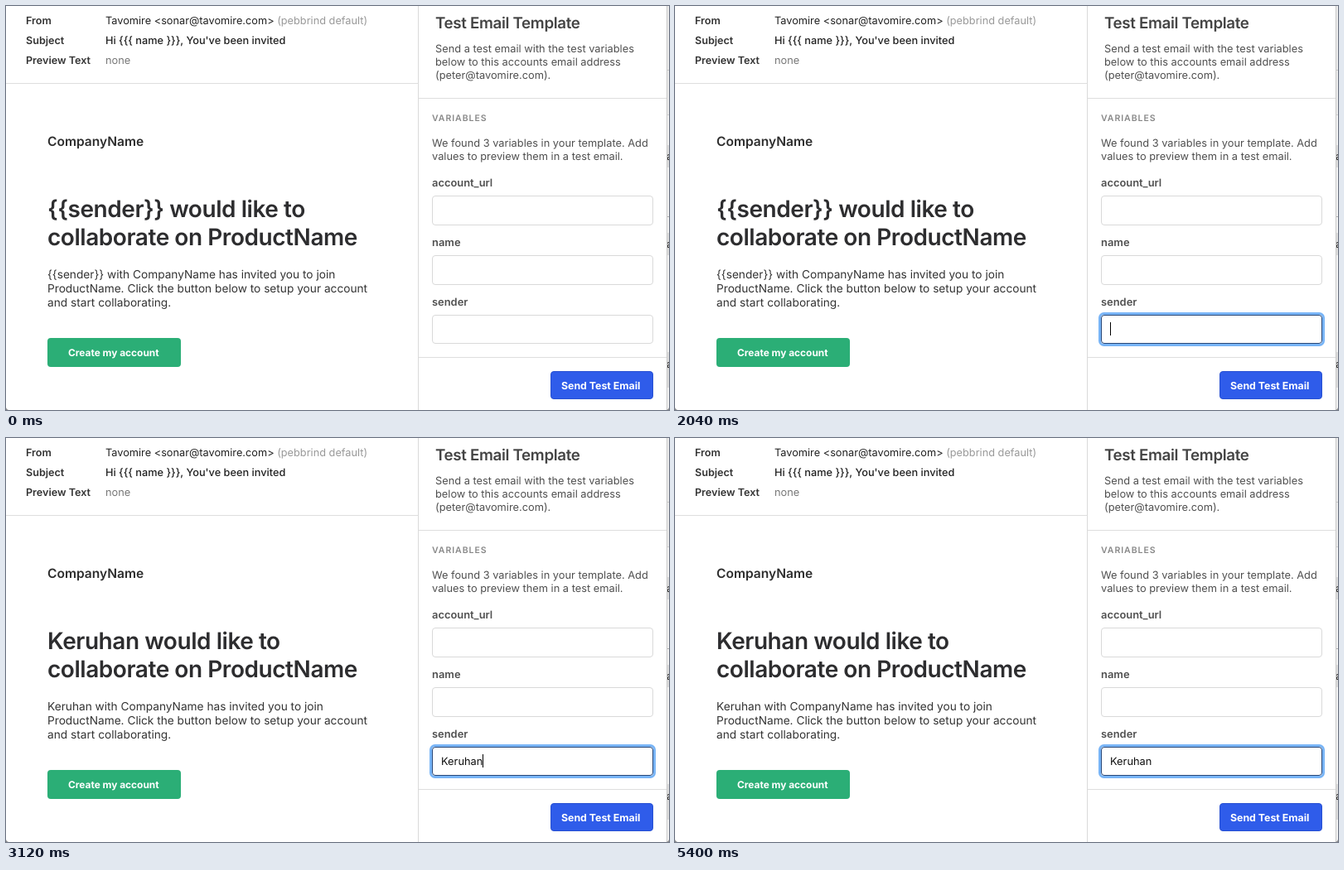
These frames come from a looping animation (800 by 488 pixels, 5440 ms). An HTML page:

```html
<!DOCTYPE html>
<html lang="en">
<head>
<meta charset="utf-8">
<title>Test email preview</title>
<style>
  html, body { margin: 0; width: 100%; height: 100%; overflow: hidden; background: #fff; }
  svg { display: block; width: 800px; height: 488px; }
  text {
    font: 400 12.82px Inter, "Liberation Sans", sans-serif;
    font-optical-sizing: none;
    text-rendering: geometricPrecision;
    fill: #505050;
    white-space: pre;
  }
  .meta { font-size: 12.75px; fill: #222; }
  .subject { font-weight: 500; }
  .key { font-size: 12.6px; font-weight: 600; fill: #333; }
  .dim { fill: #999; }
  .none { fill: #777; }
  .brand { font-size: 15.55px; font-weight: 600; fill: #2d2d2d; }
  .head { font-size: 28px; font-weight: 600; letter-spacing: -.45px; fill: #2d2d2f; }
  .body { font-size: 13.7px; fill: #333; }
  .title { font-size: 18.8px; font-weight: 600; letter-spacing: -.35px; fill: #444; }
  .caps { font-size: 10.5px; font-weight: 600; letter-spacing: .95px; fill: #888; }
  .label { font-size: 12.9px; font-weight: 600; fill: #505050; }
  .green { font-size: 11.9px; font-weight: 700; fill: #fff; }
  .blue { font-size: 12.35px; font-weight: 700; fill: #fff; }
  .value { fill: #111; }
  .field { fill: #fff; stroke: #d9d9d9; }
</style>
</head>
<body>
<svg viewBox="0 0 800 488" id="stage"></svg>
<script>
const LOOP = 5440;
const NAME = "Keruhan";
const stage = document.getElementById("stage");

function add(tag, attrs, content = "") {
  const el = document.createElementNS("http://www.w3.org/2000/svg", tag);
  for (const key in attrs) el.setAttribute(key, attrs[key]);
  el.textContent = content;
  stage.append(el);
  return el;
}
const rect = (x, y, width, height, fill, more = {}) =>
  add("rect", { x, y, width, height, fill, ...more });
const text = (x, y, cls, str = "") => add("text", { x, y, class: cls }, str);
const lines = (x, y, step, cls, list) => list.map((s, i) => text(x, y + i * step, cls, s));

// Page showing through at the right edge
rect(797, 0, 3, 488, "#f3f3f3");
rect(797, 0, 3, 131, "#ececec");
rect(797, 77, 3, 1, "#c8c8c8");
rect(797, 131, 3, 1, "#d0d0d0");
rect(797, 254, 3, 1, "#b0b0b0");
for (const [y, h, base] of [[168, 27, 186], [274, 27, 292], [418, 43, 437]]) {
  rect(797, y, 3, h, "#dcdcdc");
  text(797, base, "meta", "a");
}
rect(797, 0, 1, 488, "#c9c9c9");

// Message header
text(24, 22, "key", "From");
text(24, 46, "key", "Subject");
text(24, 70, "key", "Preview Text");
const from = text(120, 22, "meta", "Tavomire <sonar@tavomire.com> ");
from.append(add("tspan", { class: "dim" }, "(pebbrind default)"));
text(120, 46, "meta subject", "Hi {{{ name }}}, You've been invited");
text(120, 70, "none", "none");
rect(0, 93, 497, 1, "#dedede");
rect(497, 0, 1, 488, "#dadada");

// Message
text(50, 169, "brand", "CompanyName");
const head = lines(50, 255, 34, "head", ["", ""]);
const body = lines(50, 329, 17, "body", ["", "", ""]);
rect(50, 401, 161, 35, "#2bae76", { rx: 4 });
text(75, 423, "green", "Create my account");

// Side panel
text(518, 27, "title", "Test Email Template");
lines(518, 56, 16, "", [
  "Send a test email with the test variables",
  "below to this accounts email address",
  "(peter@tavomire.com)."
]);
rect(498, 111, 299, 1, "#dedede");
text(514, 139, "caps", "VARIABLES");
lines(514, 170, 16, "", [
  "We found 3 variables in your template. Add",
  "values to preview them in a test email."
]);
["account_url", "name", "sender"].forEach((label, i) => {
  const y = 229 + i * 72;
  text(514, y - 11, "label", label);
  add("rect", { x: 514.5, y: y + .5, width: 266, height: i < 2 ? 35 : 34, rx: 3.5, class: "field" });
});
const ring = rect(512.5, 371.5, 270, 38, "none", { rx: 5, stroke: "#78b4f6", "stroke-width": 3 });
const focusLine = rect(514.5, 373.5, 266, 34, "#fff", { rx: 3.5, stroke: "#294777" });
const value = text(525, 395, "value");
const caret = rect(525, 382, 1, 16, "#000");
rect(498, 424, 299, 1, "#dedede");
rect(657.5, 441.5, 123, 33, "#2f5cea", { rx: 3.5, stroke: "#2750d2" });
text(670, 463, "blue", "Send Test Email");

// Window corners
add("path", { d: "M0 485V488H3Q0.5 487.5 0 485Z", fill: "#888" });
add("path", { d: "M800 485V488H797Q799.5 487.5 800 485Z", fill: "#888" });

// Times at which each state advances
const KEYS = [2120, 2440, 2640, 2800, 2920, 3000, 3080];
const PREVIEW = [[2200, 1], [2480, 2], [2720, 3], [3000, 5], [3120, 7]];
const BLINKS = [840, 1320, 1800, 3440, 3840, 4440, 4920, 5400];
const FOCUS = 800;

function fill(nodes, list) {
  nodes.forEach((node, i) => {
    if (node.textContent !== list[i]) node.textContent = list[i];
  });
}

function showPreview(n) {
  const who = n ? NAME.slice(0, n) : "{{sender}}";
  fill(head, n && n < 5
    ? [who + " would like to collaborate", "on ProductName"]
    : [who + " would like to", "collaborate on ProductName"]);
  fill(body, n && n < 4
    ? [who + " with CompanyName has invited you to join ProductName.",
       "Click the button below to setup your account and start",
       "collaborating."]
    : [who + " with CompanyName has invited you to join",
       "ProductName. Click the button below to setup your account",
       "and start collaborating."]);
}

function draw(t) {
  const typed = KEYS.filter(k => t >= k).length;
  fill([value], [NAME.slice(0, typed)]);
  showPreview(PREVIEW.reduce((n, [at, len]) => t >= at ? len : n, 0));

  const focus = t < FOCUS ? 0 : Math.min(1, (t - FOCUS + 40) / 120);
  ring.setAttribute("opacity", focus);
  focusLine.setAttribute("opacity", focus);

  const width = typed ? value.getComputedTextLength() - .5 : 0;
  caret.setAttribute("x", Math.round(525 + width));
  caret.setAttribute("opacity", BLINKS.filter(b => t >= b).length % 2);
}

const start = performance.now();
function tick() {
  draw((performance.now() - start) % LOOP);
  requestAnimationFrame(tick);
}
draw(0);
requestAnimationFrame(tick);
</script>
</body>
</html>
```
